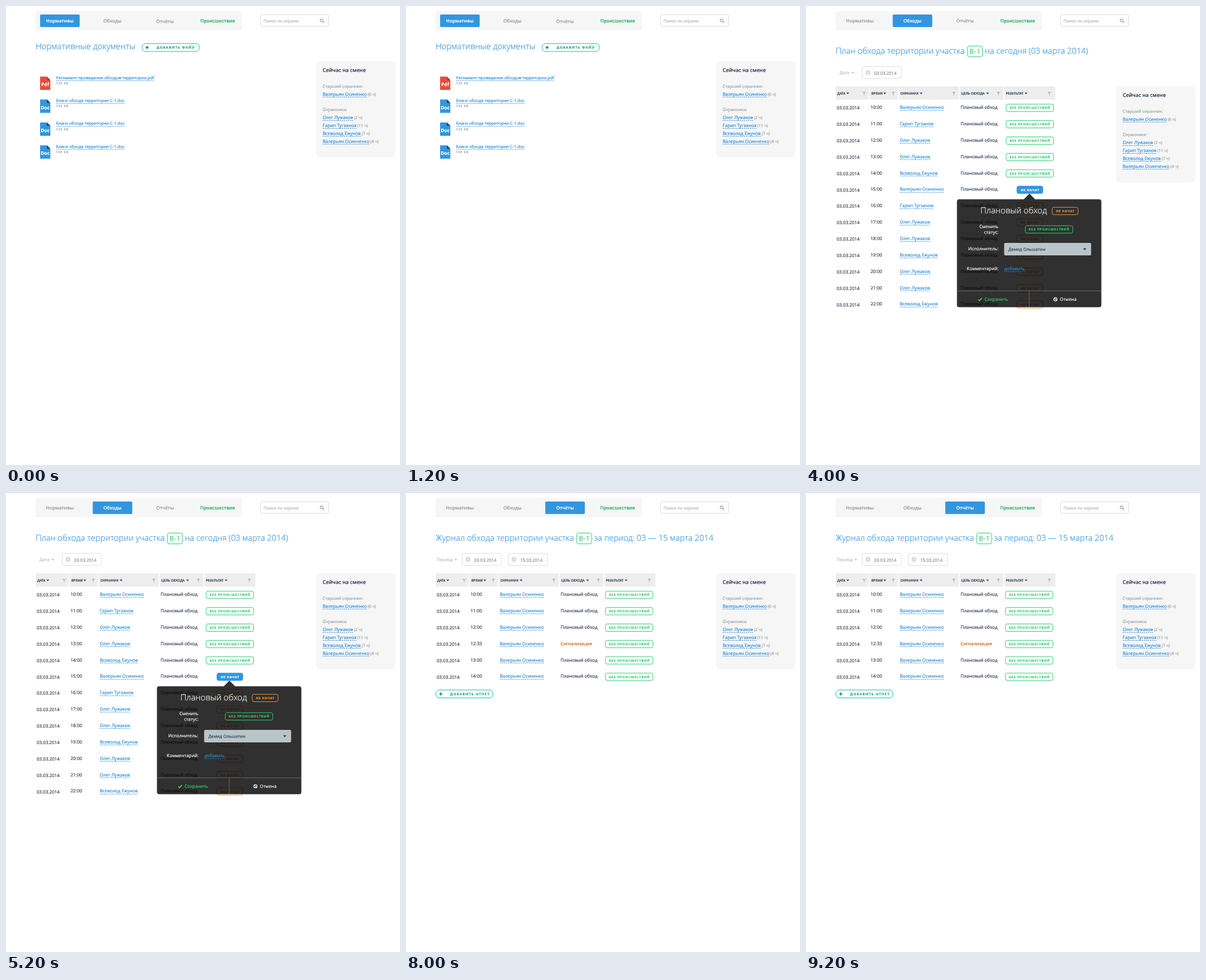
Write an HTML page that moves like this. It is 693 px wide and 808 px high and loops after 10 s.

```html
<!DOCTYPE html>
<html lang="ru">
<head>
<meta charset="utf-8">
<title>Обходы территории</title>
<style>
html, body { margin: 0; width: 100%; height: 100%; overflow: hidden; background: #fff; }
svg { display: block; width: 693px; height: 808px; }
text { font-family: "Open Sans", "Noto Sans", sans-serif; text-rendering: geometricPrecision; white-space: pre; stroke-width: .18px; }
</style>
</head>
<body>
<svg id="stage" viewBox="0 0 693 808" xmlns="http://www.w3.org/2000/svg"></svg>
<script>
const stage = document.getElementById('stage');
const BLUE = '#3295e0', LINK = '#2389d7', GREEN = '#2ecc71', ORANGE = '#ee9330';
const INK = '#2c3e50', GREY = '#95a0a5', PALE = '#bbb', TEAL = '#16a085';
const CHIEF = 'Валерьян Осиненко', IVAN = 'Олег Лужаков', TAGIR = 'Гарип Тугзанов', SLAVA = 'Всеволод Ежунов';
const FINE = 'БЕЗ ПРОИСШЕСТВИЙ', TODO = 'НЕ НАЧАТ';

let layer;

function add(tag, attrs, content) {
  const node = document.createElementNS('http://www.w3.org/2000/svg', tag);
  for (const key in attrs) node.setAttribute(key, attrs[key]);
  if (content) node.textContent = content;
  layer.appendChild(node);
  return node;
}

const box = (x, y, width, height, fill, rx = 0, stroke = 'none') =>
  add('rect', { x, y, width, height, fill, rx, stroke });

const path = (d, fill, stroke = 'none', width = 1) =>
  add('path', { d, fill, stroke, 'stroke-width': width });

// A hairline stroke in the fill colour gives the text its slightly heavy look.
function label(x, y, content, size = 7.9, fill = INK, extra = {}) {
  return add('text', { x, y, 'font-size': size, fill, stroke: fill, ...extra }, content);
}

const semibold = { 'font-weight': 600 };
const light = { 'font-weight': 300 };
const toRight = { 'text-anchor': 'end' };

// Underlined text; returns its right edge.
function link(x, y, content, size = 7.9, dash = '2.2 1.2') {
  const end = x + label(x, y, content, size, LINK).getComputedTextLength();
  add('line', { x1: x, x2: end, y1: y + 2.6, y2: y + 2.6, stroke: LINK, 'stroke-width': .9, 'stroke-dasharray': dash });
  return end;
}

const caret = (x, y, fill = INK, w = 5) => path(`M${x} ${y}h${w}l${-w / 2} ${w * .58}z`, fill);
const funnel = x => path(`M${x - 3.2} 151h6.4l-2.4 2.8v3.6l-1.6 -1.2v-2.4z`, PALE);

function badge(x, y, content, fill = 'none') {
  const width = content === FINE ? 83.5 : 45.5;
  const color = content === FINE ? GREEN : ORANGE;
  const filled = fill === BLUE;
  box(x, y, width, 13, fill, 3, filled ? BLUE : color);
  label(x + width / 2 + .4, y + 8.5, content, 5.5, filled ? '#fff' : color,
    { 'font-weight': 700, 'letter-spacing': .75, 'text-anchor': 'middle' });
}

function nav(active) {
  box(52, 9.5, 363, 33, '#f6f6f6', 2);
  ['Нормативы', 'Обходы', 'Отчёты', 'Происшествия'].forEach((name, i) => {
    const x = 94.8 + i * 92.5, on = i === active;
    if (on) box(x - 34.8, 15, 69.6, 22, BLUE, 2);
    const drop = active === 0 && i === 2 ? 1.2 : 0;
    label(x, 28.7 + drop, name, 8.15, on ? '#fff' : i === 3 ? '#27ae60' : GREY,
      { ...semibold, 'text-anchor': 'middle' });
  });
  box(447.5, 15.2, 120, 20.6, '#fff', 2, '#ddd');
  label(453, 28.6, 'Поиск по охране', 7.5, '#b0b0b0');
  add('circle', { cx: 555.2, cy: 25.3, r: 2.5, fill: 'none', stroke: '#aaa', 'stroke-width': 1.3 });
  path('M557.1 27.2l2.4 2.4', 'none', '#aaa', 1.5);
}

function sidebar(y) {
  box(545, y, 139.5, 169.5, '#f6f6f6', 7);
  label(557, y + 18.8, 'Сейчас на смене', 9, INK, semibold);
  label(557, y + 46.7, 'Старший охранник:', 7.4, GREY);
  label(557, y + 88.3, 'Охранники:', 7.4, GREY);
  const shift = [[CHIEF, 6, 60.6], [IVAN, 2, 102.1], [TAGIR, 11, 115.9], [SLAVA, 7, 129.7], ['Валерьян Осинченко', 4, 143.6]];
  for (const [name, hours, dy] of shift) {
    const end = link(557, y + dy, name);
    label(end + 1.8, y + dy, `(${hours} ч)`, 7.1, GREY);
  }
}

function addButton(x, y, content) {
  box(x + .5, y + .5, 100.5, 14, '#fff', 6, '#1abc9c');
  path(`M${x + 6.5} ${y + 7.4}h5.4M${x + 9.2} ${y + 4.7}v5.4`, 'none', TEAL, 1.9);
  label(x + 26, y + 9.6, content, 5.9, TEAL, { 'font-weight': 700, 'letter-spacing': 1.15 });
}

function fileRow(i, type, name) {
  const y = 124.3 + i * 40.3, isPdf = type === 'Pdf';
  path(`M60 ${y}h12l6 6v17.5h-18z`, isPdf ? '#e74c3c' : BLUE);
  path(`M72 ${y}l6 6h-6z`, isPdf ? '#b53a2d' : INK);
  label(69, y + 16.9, type, 8.4, '#fff', { 'font-weight': 700, 'text-anchor': 'middle' });
  link(88, y + 4.5, name, 7.35, '1 .6');
  label(88, y + 13.7, '135 КБ', 5.5, GREY, { ...semibold, 'letter-spacing': .7 });
}

function files() {
  nav(0);
  label(52, 76.4, 'Нормативные документы', 14.75, BLUE, light);
  addButton(239, 65.6, 'ДОБАВИТЬ ФАЙЛ');
  fileRow(0, 'Pdf', 'Регламент проведения обходов территории.pdf');
  for (let i = 1; i < 4; i++) fileRow(i, 'Doc', 'Бланк обхода территории С-1.doc');
  sidebar(97);
}

function heading(before, x, after, filled) {
  label(52, 84.2, before, 14.62, BLUE, light);
  box(x, 70.5, 26.5, 19, filled ? BLUE : '#fff', 3.5, filled ? BLUE : GREEN);
  label(x + 3.8, 84.4, 'В-1', 11.5, filled ? '#fff' : GREEN, { 'letter-spacing': .6 });
  label(x + 30.5, 84.2, after, 14.4, BLUE, light);
}

function dateField(x, date) {
  box(x + .5, 106.5, 69, 20.8, '#fff', 2, '#ddd');
  box(x + 7.2, 114.2, 6.4, 6.2, 'none', 1, '#b5b5b5').setAttribute('stroke-width', .8);
  path(`M${x + 7.2} 116.2h6.4M${x + 9} 113v2M${x + 11.8} 113v2M${x + 7.4} 118.3h6`, 'none', '#b5b5b5', .7);
  label(x + 21.5, 120.6, date, 7.65, '#7f8c8d');
}

function filters(name, x, caretX, dates) {
  label(x, 120.3, name, 7.6, PALE);
  caret(caretX, 116.2, PALE);
  dates.forEach((date, i) => dateField(98.5 + i * 81, date));
}

function tableHead() {
  box(52, 141.3, 386.5, 23.5, '#ededed');
  for (const x of [111.3, 162.6, 269.4, 348]) box(x - .8, 141, 1.6, 24, '#fff');
  const columns = [['ДАТА', 55, 71, 102.3], ['ВРЕМЯ', 115, 136, 153.5], ['ОХРАННИК', 166, 200, 260],
    ['ЦЕЛЬ ОБХОДА', 273, 317, 338.5], ['РЕЗУЛЬТАТ', 351.5, 384.5, 428]];
  for (const [name, x, caretX, funnelX] of columns) {
    label(x, 156.4, name, 5.8, INK, semibold);
    caret(caretX, 152.4);
    funnel(funnelX);
  }
}

function row(i, time, name, status, badgeX, { fill = '#fff', alarm } = {}) {
  const y = 181.2 + i * 28.85;
  label(54, y + 1.1, '03.03.2014');
  label(113.6, y, time);
  link(165, y, name);
  label(272, y, alarm ? 'Сигнализация' : 'Плановый обход', 7.9, alarm ? '#d35400' : INK);
  badge(badgeX, y - 8.4, status, fill);
}

function pointer() {
  path('M344.6 387.2l-1.3 -5.1q-.1 -1.2 .8 -1.4t1.3 .8l.9 2.9q1.3 -.7 1.8 .2q1.2 -.5 1.6 .4q1.3 -.2 1.5 .9l.4 2.2q.1 1.6 -.6 3l-4.3 .7l-4 -2.8q-.7 -1.2 .6 -1.4z',
    '#fff', '#333', .9);
}

function plan(selected) {
  nav(1);
  heading('План обхода территории участка', 284, 'на сегодня (03 марта 2014)');
  filters('Дата', 59, 80, ['03.03.2014']);
  tableHead();
  if (!selected) box(52, 366.5, 386.5, 29, '#eef6f6');
  const guards = [CHIEF, TAGIR, IVAN, IVAN, SLAVA, CHIEF, TAGIR, IVAN, IVAN, SLAVA, IVAN, IVAN, SLAVA];
  guards.forEach((name, i) => {
    const done = i < 5;
    row(i, `${10 + i}:00`, name, done ? FINE : TODO, done ? 352 : 371,
      { fill: selected && i === 5 ? BLUE : '#fff' });
  });
  sidebar(141);
  if (selected) statusPopup(); else pointer();
}

function popup(x, y) {
  path(`M${x + 4} ${y}H${x + 117.5}l10 -10l10 10H${x + 250}q4 0 4 4v182q0 4 -4 4H${x + 4}q-4 0 -4 -4V${y + 4}q0 -4 4 -4z`,
    'rgba(0,0,0,.81)');
  path(`M${x} ${y + 161.2}h254M${x + 127} ${y + 161.2}v28.8`, 'none', '#777', .8);
  path(`M${x + 37.5} ${y + 176}l2.3 2.3l4.3 -4.6`, 'none', GREEN, 1.8);
  label(x + 48.6, y + 178.9, 'Сохранить', 7.9, GREEN);
  add('circle', { cx: x + 173.2, cy: y + 176, r: 2.9, fill: 'none', stroke: '#fff', 'stroke-width': 1.2 });
  path(`M${x + 171.2} ${y + 174}l4 4`, 'none', '#fff', 1.2);
  label(x + 181, y + 178.9, 'Отмена', 7.9, '#fff');
}

function statusPopup() {
  popup(265.5, 340.3);
  label(306.8, 365.2, 'Плановый обход', 14.8, '#fff', light);
  badge(433, 354.3, TODO);
  const captions = [['Сменить', 391], ['статус:', 401], ['Исполнитель:', 430.3], ['Комментарий:', 465.1]];
  for (const [name, y] of captions) label(338.5, y, name, 7.9, '#fff', toRight);
  badge(385.7, 386.8, FINE);
  box(348.5, 417, 153, 22, '#b9c5c8', 2);
  label(356, 431.1, 'Демид Ольшатин', 7.6);
  caret(487.3, 426.5, INK, 6);
  link(348.8, 465.1, 'добавить');
}

function sectionPopup() {
  popup(186, 101.3);
  label(249, 124.2, 'Выберите участок:', 14.8, '#fff', light);
  ['В1', 'В2', 'В2'].forEach((name, i) => label(249, 149.2 + i * 23.3, name, 7.9, '#fff'));
  badge(269.5, 139.8, FINE);
  link(269.3, 195.7, 'добавить');
}

function journal(choosing) {
  nav(2);
  heading('Журнал обхода территории участка', 300.3, 'за период: 03 — 15 марта 2014', choosing);
  filters('Период', 54, 85, choosing ? ['12.11.2013', '12.11.2013'] : ['03.03.2014', '15.03.2014']);
  tableHead();
  ['10:00', '11:00', '12:00', '12:33', '13:00', '14:00'].forEach((time, i) =>
    row(i, time, CHIEF, FINE, 350.8, { alarm: i === 3 }));
  addButton(52, 346.3, 'ДОБАВИТЬ ОТЧЕТ');
  sidebar(141);
  if (choosing) sectionPopup();
}

const scenes = [files, () => plan(false), () => plan(true), () => journal(true), () => journal(false)].map(draw => {
  layer = stage;
  const group = layer = add('g', {});
  draw();
  return group;
});

function render(ms) {
  const current = Math.floor(ms % 10000 / 2000);
  scenes.forEach((group, i) => group.setAttribute('display', i === current ? 'inline' : 'none'));
}

const start = performance.now();
function tick() {
  render(performance.now() - start);
  requestAnimationFrame(tick);
}
tick();
</script>
</body>
</html>
```
